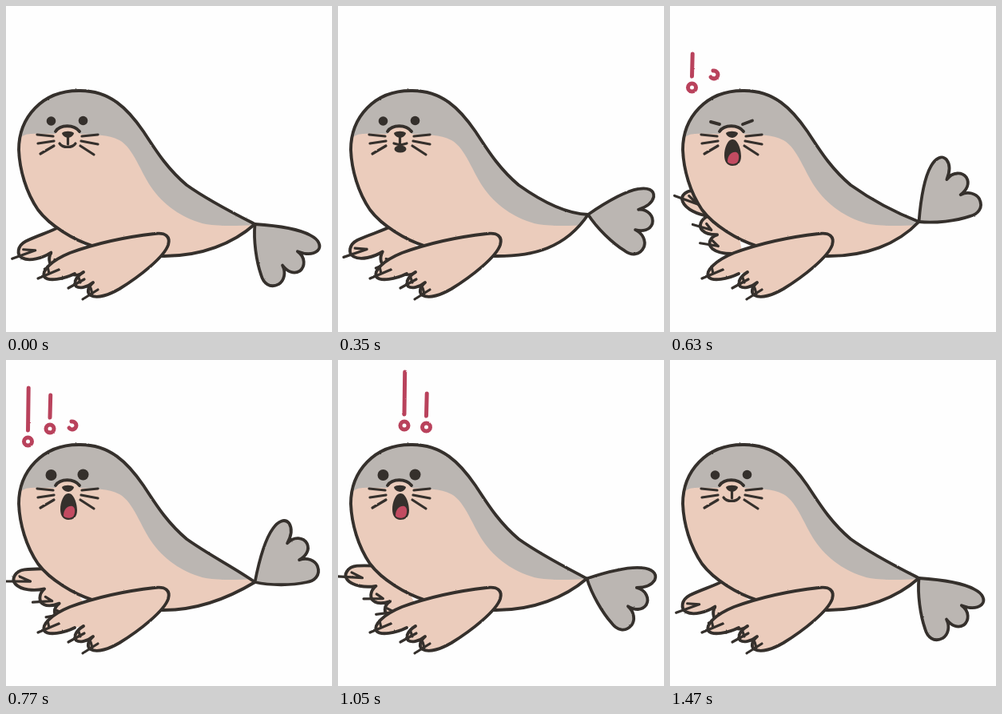
These frames come from a looping animation (408 by 408 pixels, 1540 ms). An HTML page:

```html
<!DOCTYPE html>
<html lang="en">
<head>
<meta charset="utf-8">
<title>Barking seal</title>
<style>
html, body { margin: 0; width: 100%; height: 100%; overflow: hidden; background: #fefefe; }
svg { display: block; width: 100vw; height: 100vh; }
.ink { fill: none; stroke: #35302c; stroke-width: 3.9; stroke-linecap: round; stroke-linejoin: round; }
.thin { stroke-width: 3.2; }
.skin { fill: #ebccbc; }
.grey { fill: #bbb6b2; }
.dark { fill: #35302c; }
.red { fill: #c24b61; }
.mark { fill: none; stroke: #b9425c; stroke-width: 5; stroke-linecap: round; }
</style>
</head>
<body>
<svg viewBox="0 0 408 408">
  <defs>
    <filter id="crayon" filterUnits="userSpaceOnUse" x="0" y="0" width="408" height="408" color-interpolation-filters="sRGB">
      <feTurbulence type="fractalNoise" baseFrequency="0.3" numOctaves="2" seed="4"/>
      <feDisplacementMap in="SourceGraphic" scale="1.6" xChannelSelector="R" yChannelSelector="G"/>
    </filter>
    <clipPath id="bodyClip"><path id="clipShape"/></clipPath>
  </defs>
  <g filter="url(#crayon)">
    <g id="tail">
      <path class="ink grey" d="M0 0C13 -18 34 -44 50 -53C60 -59 70 -59 72 -50C73 -41 67 -34 59 -28C71 -33 81 -26 82 -17C82 -8 74 -3 64 -2C75 -1 82 7 82 15C81 28 70 31 60 28C42 24 17 13 0 0Z"/>
    </g>
    <g id="farFlipper">
      <path class="ink skin" d="M75 250C60 249 45 244 28 242C16 241 9 250 13 257C18 266 34 271 47 271C38 276 36 286 42 290C47 294 54 294 61 293C52 297 50 306 57 311C65 316 78 316 95 312"/>
      <path class="ink thin" d="M2 251L32 258M20 249L32 258M29 284L53 288M46 281L53 288M41 306L64 307M56 301L64 307"/>
    </g>
    <path id="bodyFill" class="grey"/>
    <path class="skin" clip-path="url(#bodyClip)" d="M0 168L19 164C26 158 38 160 62 160C66 149 86 149 92 160C110 162 128 160 142 168C160 178 168 208 184 230C200 252 226 268 250 273C270 276 290 275 320 274V330H0Z"/>
    <path id="bodyLine" class="ink"/>
    <path class="ink skin" d="M97 333C87 339 84 347 88 351C92 354 102 352 109 346C102 352 101 359 106 362C114 367 130 361 142 354C168 338 198 314 203 299C206 289 200 283 186 285C150 289 110 298 80 309C58 318 44 331 48 339C53 345 72 342 86 335"/>
    <path class="ink thin" d="M40 341L66 330M52 326L54 335M78 353L98 342M91 340L93 346M96 367L115 355M106 353L108 360"/>
    <path class="ink thin" d="M39 161L59 163M40 172L60 169M43 185L60 175M95 163L115 161M94 169L115 173M93 175L110 186"/>
    <path class="ink" d="M62 157C68 148 85 148 92 157"/>
    <path class="dark" d="M70 159C73 156 82 156 85 159C85 162 80 165 78 165C75 165 70 162 70 159Z"/>
    <g id="eyesOpen" class="dark">
      <circle class="eye" cx="56.5" cy="144"/>
      <circle class="eye" cx="96.5" cy="143.500"/>
    </g>
    <path id="eyesShut" class="ink" d="M51 145L62 148M91 148L103 143.500"/>
    <path id="smile" class="ink thin" d="M77.500 163V173M67 172C71 178 83 178 87 172"/>
    <g id="smallMouth">
      <path class="ink thin" d="M77.500 163V177M70 172L78 174L86 172"/>
      <ellipse class="dark" cx="78" cy="179" rx="7.500" ry="4.500"/>
    </g>
    <g id="bigMouth">
      <path class="dark" d="M78 167C84 166 89 178 89 188C89 197 84 200 78 200C72 200 68 195 68 187C68 178 72 167 78 167Z"/>
      <path class="red" d="M72 195C72 186 78 182 83 183C87 184 87 192 84 196C80 199 74 198 72 195Z"/>
    </g>
    <g id="marks"></g>
  </g>
</svg>
<script>
const STEP = 70, LOOP = 1540;
const $ = id => document.getElementById(id);
const show = (id, on) => $(id).style.display = on ? "" : "none";
const within = (t, a, b) => t >= a && t <= b;

const rootKeys = [[0, 273], [350, 261], [630, 270], [770, 278], [910, 271], [1190, 276], [1470, 273]];
const flipperKeys = [[0, -33], [350, -32], [420, -22], [490, -8], [560, 4], [630, 7], [770, -13],
  [910, 0], [980, 2], [1050, -10], [1190, 0], [1260, -10], [1400, -31], [1470, -33]];
const mouthKeys = [[420, 0.55], [490, 0.85], [560, 1], [1120, 1], [1190, 0.82], [1260, 0.55]];
const spots = [[27.5, 102], [55, 86], [83, 82], [110.5, 84]];
const barHeights = [0, 23, 44, 57, 69, 69];

function keyed(keys, t) {
  if (t <= keys[0][0]) return keys[0][1];
  for (let i = 1; i < keys.length; i++) {
    const [a, va] = keys[i - 1], [b, vb] = keys[i];
    if (t <= b) return va + (vb - va) * (t - a) / (b - a);
  }
  return keys[keys.length - 1][1];
}

// The rear end of the body follows the root of the tail.
function bodyPath(x, y) {
  const belly = 297 - (y - 272) / 2;
  return "M108 300C85 293 55 275 40 255C25 233 17 205 16 180C16 140 45 105 93 106" +
    `C130 106 152 128 172 157C186 178 200 202 226 224C254 244 286 260 ${x} ${y}` +
    `C285 ${belly} 245 314 194 313`;
}

function tailAngle(t) {
  const phase = Math.min(1, Math.max(0, (t - 90) / 1150));
  return 13 + 45 * Math.cos(phase * 2 * Math.PI);
}

function markPath([x, y], n) {
  if (n < 0 || n >= barHeights.length) return "";
  if (n === 0) return `M${x - 1} ${y - 5}A5 5 0 1 1 ${x - 4} ${y + 3}`;
  const ring = `M${x - 5} ${y}a5 5 0 1 1 10 0a5 5 0 1 1 -10 0`;
  return `${ring}M${x} ${y - 14}L${x + 0.7} ${y - barHeights[n] + 2}`;
}

const marks = spots.map(() => {
  const p = document.createElementNS("http://www.w3.org/2000/svg", "path");
  p.setAttribute("class", "mark");
  return $("marks").appendChild(p);
});
const eyes = document.querySelectorAll(".eye");

function draw(t) {
  const y = keyed(rootKeys, t), x = y < 265 ? 313 : 311.5;
  const body = bodyPath(x, y);
  for (const id of ["clipShape", "bodyFill", "bodyLine"]) $(id).setAttribute("d", body);
  $("tail").setAttribute("transform", `translate(${x} ${y}) rotate(${tailAngle(t)}) scale(0.97)`);
  $("farFlipper").setAttribute("transform", `rotate(${keyed(flipperKeys, t)} 115 274)`);

  const big = within(t, 420, 1260), small = within(t, 280, 350) || t === 1330;
  const s = keyed(mouthKeys, t);
  show("bigMouth", big);
  show("smallMouth", small);
  show("smile", !big && !small);
  $("bigMouth").setAttribute("transform", `translate(78 167) scale(${0.4 + 0.6 * s} ${s}) translate(-78 -167)`);

  const shut = within(t, 560, 630) || within(t, 1190, 1260);
  show("eyesOpen", !shut);
  show("eyesShut", shut);
  eyes.forEach(e => e.setAttribute("r", big ? 7 : 5.8));

  marks.forEach((m, i) => m.setAttribute("d", markPath(spots[i], (t - 490) / STEP - 2 * i)));
}

const start = performance.now();
function tick() {
  const t = (performance.now() - start) % LOOP;
  draw(Math.floor(t / STEP) * STEP);
  requestAnimationFrame(tick);
}
tick();
</script>
</body>
</html>
```
